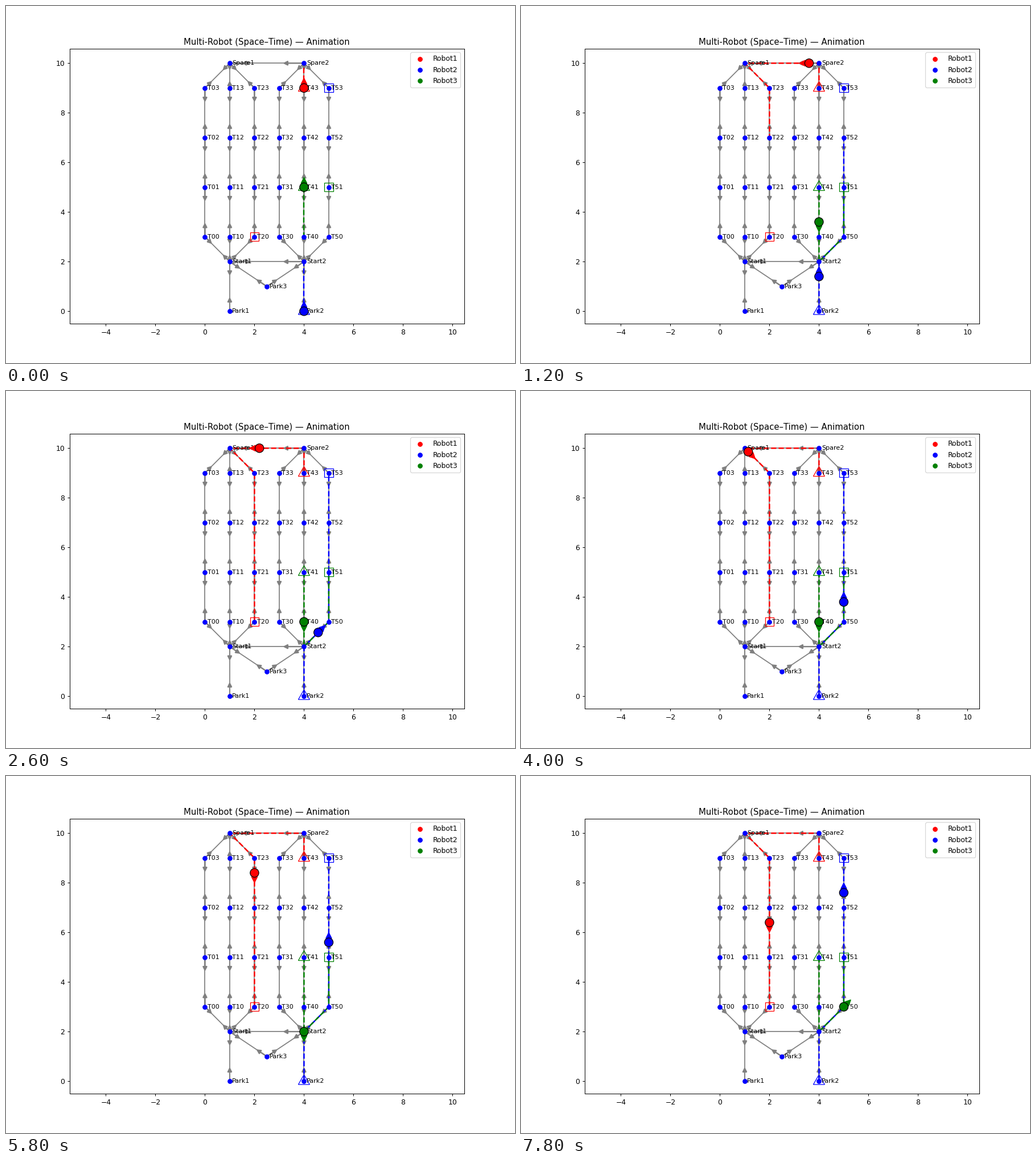
These frames come from a looping animation (894 by 626 pixels, 8 s). A matplotlib script:

```python
import math

import matplotlib.pyplot as plt
import numpy as np
from matplotlib.animation import FuncAnimation
from matplotlib.patches import Circle, FancyArrow, Rectangle, RegularPolygon

FRAMES, INTERVAL = 40, 200
WIDTH, HEIGHT, DPI = 894, 626, 89.4
SPEED = 0.2  # distance per step

nodes = {f"T{c}{r}": (c, 3 + 2 * r) for c in range(6) for r in range(4)}
nodes.update(Park1=(1, 0), Park2=(4, 0), Park3=(2.5, 1), Start1=(1, 2),
             Start2=(4, 2), Spare1=(1, 10), Spare2=(4, 10))

edges = [(f"T{c}{r}", f"T{c}{r + 1}") for c in range(6) for r in range(3)]
for c in range(6):
    side = 1 + c // 3
    edges += [(f"Start{side}", f"T{c}0"), (f"T{c}3", f"Spare{side}")]
edges += [("Park1", "Start1"), ("Park2", "Start2"), ("Park3", "Start1"),
          ("Park3", "Start2"), ("Start1", "Start2"), ("Spare1", "Spare2")]

plt.rcParams["font.family"] = "DejaVu Sans"
fig, ax = plt.subplots(figsize=(WIDTH / DPI, HEIGHT / DPI), dpi=DPI)
ax.set_title("Multi-Robot (Space–Time) — Animation")
low, high = -0.50375, 10.57875
half = (high - low) * (WIDTH * 0.775) / (HEIGHT * 0.77) / 2
ax.set_xlim(2.5 - half, 2.5 + half)
ax.set_ylim(low, high)


def draw_edge(a, b):
    """Line with one arrowhead leaving each end."""
    p, q = np.array(nodes[a], float), np.array(nodes[b], float)
    ax.plot(*zip(p, q), color="gray", lw=1.4, zorder=1)
    size = math.dist(p, q)
    for start, end in ((p, q), (q, p)):
        dx, dy = (end - start) / size * (0.28 * size - 0.03)
        ax.add_patch(FancyArrow(*start, dx, dy, width=0.001, head_width=0.16,
                                head_length=0.16, length_includes_head=True,
                                color="gray", lw=1.5, zorder=1.5))


for edge in edges:
    draw_edge(*edge)
ax.scatter(*zip(*nodes.values()), s=36, color="blue", zorder=2.5)
for name, (x, y) in nodes.items():
    ax.text(x + 0.1, y, name, fontsize=9, va="center", zorder=3)


class Robot:
    def __init__(self, label, color, route, waits=None):
        self.route = np.array([nodes[n] for n in route], float)
        self.times, self.points = [0], [self.route[0]]
        for name, p in zip(route[1:], self.route[1:]):
            self.add(round(math.dist(self.points[-1], p) / SPEED), p)
            if waits and name in waits:
                self.add(waits[name], p)

        x, y = self.route[0]
        gx, gy = self.route[-1]
        ax.add_patch(RegularPolygon((x, y), 3, radius=0.265, fill=False,
                                    ec=color, lw=1, zorder=2.6))
        ax.add_patch(Rectangle((gx - 0.175, gy - 0.175), 0.35, 0.35,
                               fill=False, ec=color, lw=1, zorder=2.6))
        ax.scatter([], [], color=color, label=label)
        self.line, = ax.plot([], [], "--", color=color, lw=2, zorder=2)
        self.arrow = FancyArrow(x, y, 0, 0.16, width=0.02, head_width=0.24,
                                head_length=0.24, color=color, zorder=4)
        ax.add_patch(self.arrow)
        self.body = Circle((x, y), 0.175, fc=color, ec="black", lw=1, zorder=5)
        ax.add_patch(self.body)

    def add(self, steps, p):
        self.times.append(self.times[-1] + steps)
        self.points.append(p)

    def heading(self, t):
        u = np.array([0.0, 1.0])
        for t0, p, q in zip(self.times, self.points, self.points[1:]):
            gap = math.dist(p, q)
            if t0 < t and gap > 0:
                u = (q - p) / gap
        return u

    def show(self, t):
        x, y = (np.interp(t, self.times, axis) for axis in zip(*self.points))
        dx, dy = 0.16 * self.heading(t)
        self.body.center = x, y
        self.arrow.set_data(x=x, y=y, dx=dx, dy=dy)
        shown = self.route[:2 + t // 2]
        self.line.set_data(shown[:, 0], shown[:, 1])


robots = [
    Robot("Robot1", "red",
          ["T43", "Spare2", "Spare1", "T23", "T22", "T21", "T20"]),
    Robot("Robot2", "blue",
          ["Park2", "Start2", "T50", "T51", "T52", "T53"]),
    Robot("Robot3", "green", ["T41", "T40", "Start2", "T50", "T51"],
          {"T40": 12, "Start2": 5, "T50": 3}),
]
ax.legend(loc="upper right").set_zorder(6)


def update(i):
    t = i + 1 if i else 0
    for robot in robots:
        robot.show(t)
    return []


anim = FuncAnimation(fig, update, frames=FRAMES, interval=INTERVAL,
                     init_func=lambda: update(0), repeat=True, repeat_delay=0)
plt.show()
```
